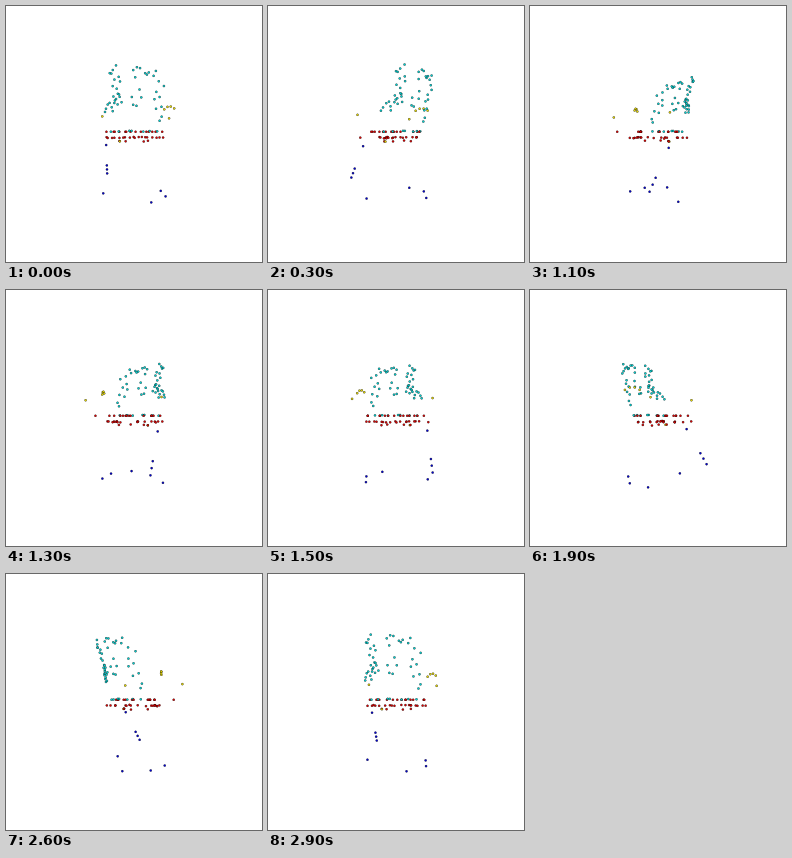
A matplotlib script for the animation above (3 s loop, 256 by 256 pixels).

```python
import numpy as np
import matplotlib.pyplot as plt
from matplotlib.animation import FuncAnimation

SIZE, DPI = 256, 100
FRAMES, INTERVAL = 30, 100
CX, CY = 128.0, 125.5     # vanishing point on the stage
EYE = 240.0               # camera distance in stage pixels

CYAN, RED = "#00d2d2", "#dc0000"
YELLOW, BLUE = "#e6d800", "#0000d2"

rng = np.random.default_rng(7)


def spread(count, low, high):
    """Random values, one in each equal slice of the range, in mixed order."""
    slots = (np.arange(count) + rng.random(count)) / count
    return low + (high - low) * rng.permutation(slots)


def back_patch(count, x_range, height_range):
    """Dots on the back rest: it leans away and curls in at its sides."""
    x = spread(count, *x_range)
    height = spread(count, *height_range)
    z = 17 + 0.34 * height - 9 * (x / 28) ** 2
    return np.column_stack([x, -height, z])


def seat_layer(count, y, half_width, front):
    """Dots on one level of the seat, denser towards the back."""
    x = spread(count, -half_width, half_width)
    z = 16 + (front - 16) * spread(count, 0, 1) ** 1.3
    return np.column_stack([x, np.full(count, y), z])


def build_back():
    return np.vstack([
        back_patch(9, (-22, -12), (37, 58)),    # upper left
        back_patch(9, (-19, -11), (24, 35)),    # left
        back_patch(6, (-29, -18), (17, 27)),    # left edge
        back_patch(9, (-3, 20), (47, 56)),      # top
        back_patch(5, (-4, 8), (20, 38)),       # middle
        back_patch(9, (18, 28), (9, 46)),       # right
        back_patch(7, (-25, 24), (0, 1)),       # foot of the rest
    ])


def build_seat():
    return np.vstack([
        seat_layer(14, 0, 29, -36),
        seat_layer(18, 5.8, 30, -33),
        seat_layer(4, 9.2, 26, -14),
    ])


def build_arms():
    t = np.linspace(0, 1, 4)
    rest = np.column_stack([31 + 8.5 * t,
                            -23 - 2.5 * np.sin(np.pi * t),
                            -6 + 10 * t])
    single = [(39, -15, -27), (-34, -16.5, -17), (-14, 9.4, 2)]
    return np.vstack([rest, single])


def build_legs():
    along = np.array([0, 0.7, 0.85, 1])[:, None]
    top, bottom = np.array([-29.5, 14, -14]), np.array([-31, 48, -37])
    post = top + (bottom - top) * along
    angle = np.radians([187, -26, 14, 61])
    feet = np.column_stack([31.5 * np.cos(angle),
                            np.full(4, 62.5),
                            31.5 * np.sin(angle)])
    return np.vstack([post, feet])


parts = [(build_back(), CYAN), (build_seat(), RED),
         (build_arms(), YELLOW), (build_legs(), BLUE)]
cloud = np.vstack([points for points, _ in parts])
colors = np.repeat([color for _, color in parts],
                   [len(points) for points, _ in parts])

fig = plt.figure(figsize=(SIZE / DPI, SIZE / DPI), dpi=DPI, facecolor="white")
ax = fig.add_axes([0, 0, 1, 1])
ax.set_xlim(0, SIZE)
ax.set_ylim(SIZE, 0)
ax.axis("off")

px = 72 / DPI
dots = ax.scatter(np.zeros(len(cloud)), np.zeros(len(cloud)), s=(2.1 * px) ** 2,
                  c=colors, edgecolors="black", linewidths=0.3 * px)


def draw(i):
    turn = 2 * np.pi * i / FRAMES
    c, s = np.cos(turn), np.sin(turn)
    x, y, z = cloud.T
    side, depth = x * c + z * s, z * c - x * s
    scale = 1 / (1 - depth / EYE)
    spots = np.column_stack([CX + side * scale, CY + y * scale + 0.3])
    order = np.argsort(depth)   # far points first
    dots.set_offsets(spots[order])
    dots.set_facecolors(list(colors[order]))
    return (dots,)


anim = FuncAnimation(fig, draw, frames=FRAMES, interval=INTERVAL,
                     repeat=True, repeat_delay=0, blit=False)
plt.show()
```
